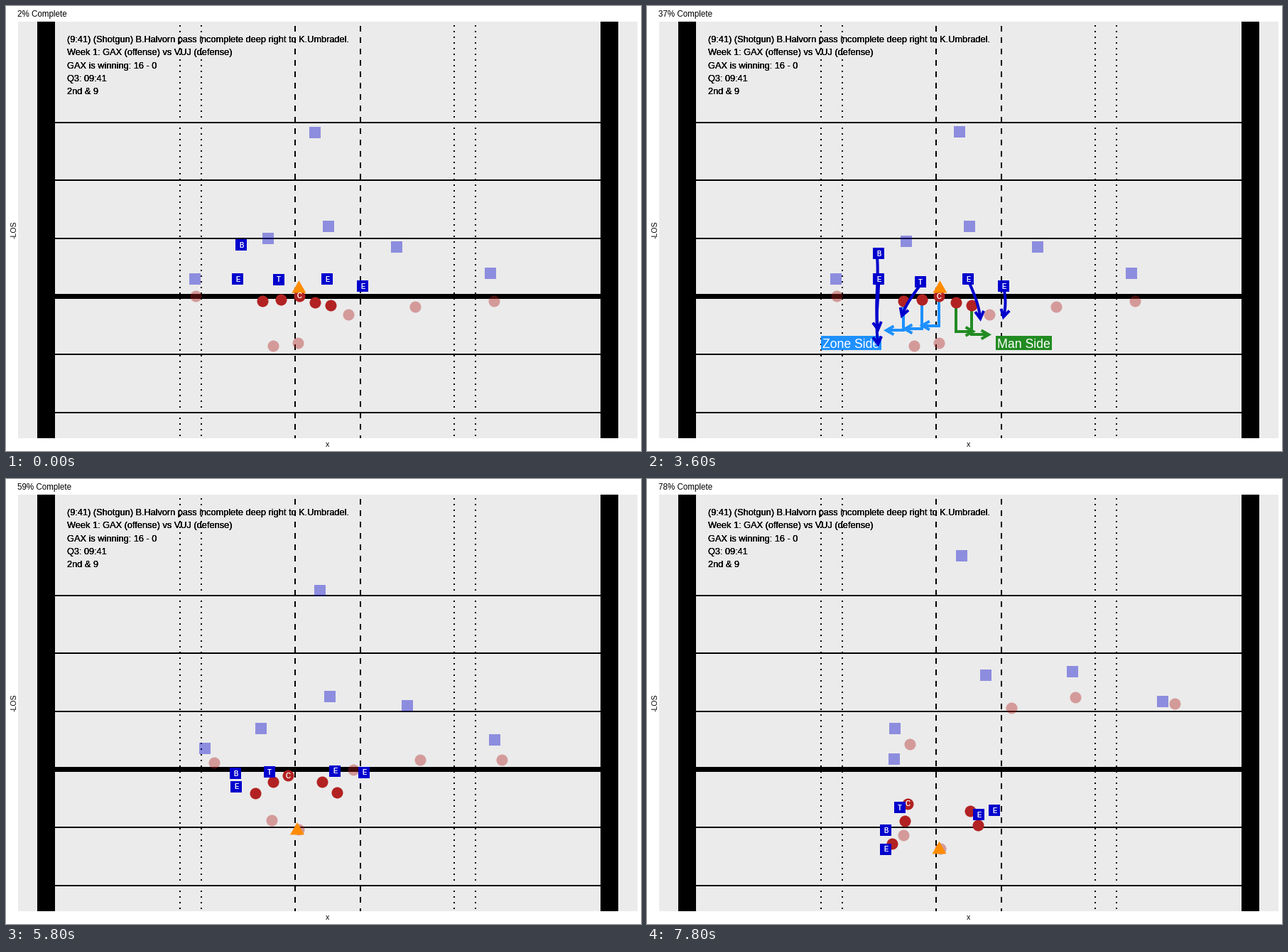
Recreate the animation shown at these times as a matplotlib script. Size 894x626 px, loop 8000 ms.

```python
import numpy as np
import matplotlib.pyplot as plt
from matplotlib.animation import FuncAnimation
from matplotlib.patches import Polygon, Rectangle

W, H, DPI = 894, 626, 64
PT = 72 / DPI                      # points per pixel
FRAMES, STEP, TOTAL = 40, 200, 51
HOLD, PAUSE = 6, 12                # step that is held, and for how long
SNAP, LAST = 9, 27                 # steps when the ball is snapped and the loop ends
MID, LOS, YARDS5 = 412, 408.5, 81.6
SWING = 8                          # how far linemen swing wide of a direct path

plt.rcParams["font.family"] = "Liberation Sans"
GREY, BLUE, RED = "#EBEBEB", "#0000CD", "#B22222"
SKY, GREEN, ORANGE = "#1E90FF", "#228B22", "#FF8C00"


class Squad:
    """Players as (x, y, dx, dy, pace): spot at the snap, run after it, easing power."""

    def __init__(self, players, swing=0, drift=None):
        p = np.array(players, float)
        self.spot, self.run, self.pace = p[:, :2], p[:, 2:4], p[:, 4:]
        self.wide = swing * np.sign(self.spot[:, 0] - MID)
        self.drift = np.zeros_like(self.spot)
        for i, v in (drift or {}).items():
            self.drift[i] = v

    def at(self, t):
        s = max(0, (t - SNAP) / (LAST - SNAP))
        pos = self.spot + self.drift * min(0, t - SNAP) + self.run * s ** self.pace
        pos[:, 0] += self.wide * 6.75 * s * s * (1 - s)
        return pos


coverage = Squad([(442, 176, 1, -68, 1.6), (454, 309.5, 23, -33, 2.8),
                  (363, 333, -15, 61, 1.5), (550, 339, 49, -68, 1.5),
                  (265.6, 384.5, 83, -33.5, 2.2), (682, 376.5, 44, -63.5, 2.4)],
                 drift={0: (0.8, -0.2), 2: (-0.7, 0.7)})
rush = Squad([(324, 354, 12.5, 140.5, 1.05), (326, 384, 10.5, 137, 1.28),
              (386, 390, -30.5, 72, 1.45), (452, 384, 15, 88, 1.45),
              (502, 393.5, -13, 72.5, 1.6)],
             SWING, {0: (-0.8, 2), 2: (0.2, 0.6)})
block = Squad([(361, 415, -16, 98, 1.6), (387, 413, -24, 68, 2),
               (410.5, 408.5, -44, 48.5, 2.1), (435, 416.5, 20, 50, 2),
               (457, 421, 9, 66, 1.5)],
              SWING, {2: (-0.3, 0.1)})
skill = Squad([(266.5, 408, 103.5, -35, 1.7), (482, 433.5, 31, -111.5, 1.85),
               (576, 423, 27, -116, 1.75), (686.5, 415, 56.5, -99.5, 1.95),
               (410.5, 474, 2.5, 45.5, 1.1), (375.5, 478, -15, 23, 3)])
PASSER = 4


def ball_at(t):
    """Rests at the line, flies back, then stays with the passer."""
    s = min(1, max(0, (t - 7) / 7)) ** 1.3
    hand = skill.at(t)[PASSER] + (-1.5, 2)
    return (1 - s) * np.array([412.4, 397.8]) + s * hand


fig = plt.figure(figsize=(W / DPI, H / DPI), dpi=DPI, facecolor="white")
ax = fig.add_axes([0, 0, 1, 1])
ax.set(xlim=(0, W), ylim=(H, 0))
ax.axis("off")


def box(x0, y0, x1, y1, color, z=0):
    return ax.add_patch(Rectangle((x0, y0), x1 - x0, y1 - y0, fc=color, lw=0, zorder=z))


def line(xs, ys, color="black", lw=2, z=1, **kw):
    return ax.plot(xs, ys, color=color, lw=lw * PT, zorder=z, solid_capstyle="butt",
                   solid_joinstyle="miter", dash_capstyle="butt", **kw)[0]


def text(x, y, s, px, color="black", z=8, **kw):
    return ax.text(x, y, s, fontsize=px * PT, color=color, zorder=z, **kw)


def arrow(pts, color, z):
    pts = np.asarray(pts, float)
    tip = pts[-1]
    dx, dy = tip - pts[-2]
    a = np.arctan2(dy, dx) + np.pi + np.radians([-30, 30])
    wings = tip + 12 * np.column_stack([np.cos(a), np.sin(a)])
    head = np.array([wings[0], tip, wings[1]])
    return [line(*pts.T, color, 4, z), line(*head.T, color, 4, z)]


def dots(marker, color, alpha, z):
    return ax.scatter([], [], s=(16 * PT) ** 2, marker=marker, color=color,
                      alpha=alpha, linewidths=0, zorder=z)


# Field
box(17, 22, 889, 608, GREY)
for k in (-3, -2, -1, 1, 2):
    y = round(LOS + k * YARDS5)
    line([69, 837], [y, y])
box(69, LOS - 3.5, 837, LOS + 3.5, "black", 1)
for x in (245, 275, 631, 661):
    line([x, x], [27, 608], ls=(0, (1, 3)))
for x in (407, 499):
    line([x, x], [28, 608], ls=(0, (4, 4)))
for x in (44, 837):
    box(x, 22, x + 25, 608, "black", 2)

# Captions, stacked to get the heavy look
CAPTIONS = ["(9:41) (Shotgun) B.Halvorn pass incomplete deep right to K.Umbradel.",
            "Week 1: GAX (offense) vs VUJ (defense)",
            "GAX is winning: 16 - 0", "Q3: 09:41", "2nd & 9"]
for i, s in enumerate(CAPTIONS):
    for _ in range(3):
        text(85.5, 51.2 + 18.3 * i, s, 12.75)
title = text(16.5, 15, "", 11.65)
text(452, 620, "x", 10.5, ha="center")
text(11.2, 315, "-LOS", 10.5, rotation=90, ha="center", va="center")

# Players
groups = [(skill, dots("o", RED, 0.4, 4)), (coverage, dots("s", BLUE, 0.4, 4)),
          (block, dots("o", RED, 1, 5)), (rush, dots("s", BLUE, 1, 6))]
ball = ax.add_patch(Polygon(np.zeros((3, 2)), fc=ORANGE, lw=0, zorder=7))
TRIANGLE = np.array([[0, -11.6], [10, 5.8], [-10, 5.8]])
letters = [[text(0, 0, c, 9.5, "white", 9, ha="center") for _ in range(2)]
           for c in "BETEEC"]

# Blocking scheme, visible while the play is held
scheme = []
for i, (x, y) in enumerate(block.at(HOLD)):
    side, color = (-24, SKY) if i < 3 else (24, GREEN)
    scheme += arrow([(x, y), (x, y + 41.3), (x + side, y + 41.3)], color, 3)
trails = np.array([rush.at(t) for t in np.linspace(HOLD, 22.15, 40)])
for i in range(trails.shape[1]):
    scheme += arrow(trails[:, i], BLUE, 6)
for x0, x1, s, color in ((245, 330, "Zone Side", SKY), (491, 570, "Man Side", GREEN)):
    scheme += [box(x0, 464, x1, 484, color, 5),
               text((x0 + x1) / 2, 480.6, s, 17.6, "white", 5.5, ha="center")]


def update(i):
    t = i if i <= HOLD else max(HOLD, i - PAUSE)
    title.set_text(f"{round(100 * (i + 1) / TOTAL)}% Complete")
    for squad, art in groups:
        pos = squad.at(t)
        if squad in (coverage, rush):
            pos = np.round(pos)
        art.set_offsets(pos)
    ball.set_xy(ball_at(t) + TRIANGLE)
    named = np.vstack([np.round(rush.at(t)), block.at(t)[2:3]])
    for pair, (x, y) in zip(letters, named):
        for lab in pair:
            lab.set_position((x, y + 3.5))
    for art in scheme:
        art.set_visible(HOLD <= i <= HOLD + PAUSE)
    return []


anim = FuncAnimation(fig, update, frames=FRAMES, interval=STEP, repeat=True,
                     repeat_delay=0, blit=False)
plt.show()
```
